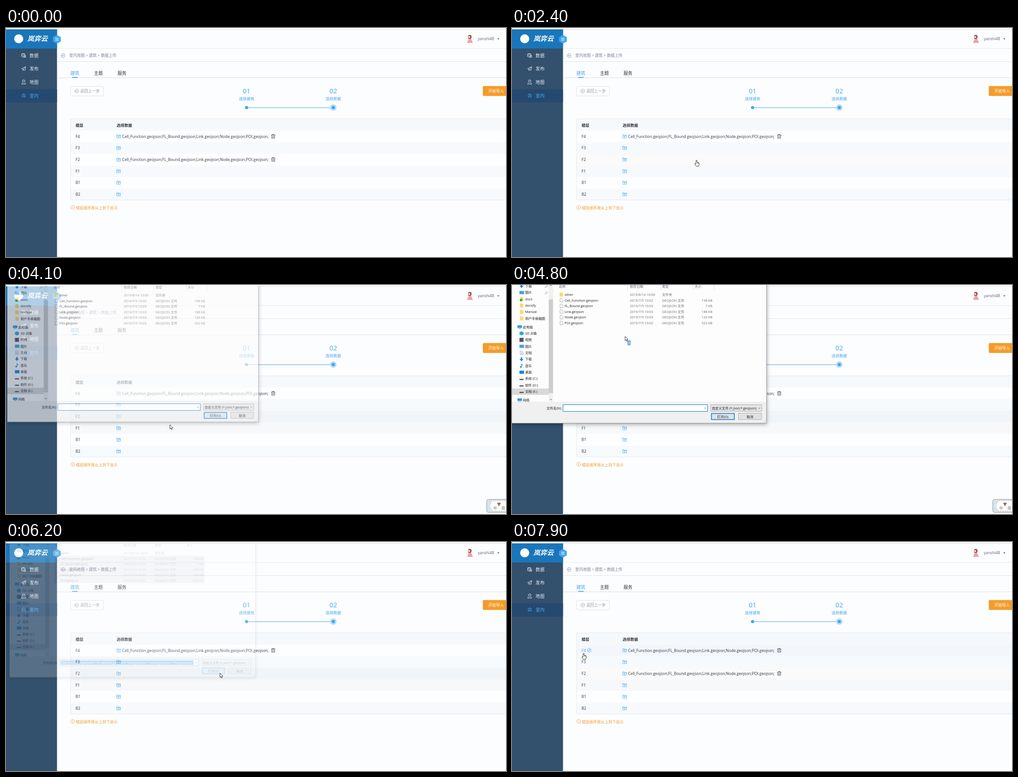
Animation, 1103 px wide and 508 px high, one loop 8 s. Source, as an HTML page with a canvas:

```html
<!DOCTYPE html>
<html lang="zh-CN">
<head>
<meta charset="utf-8">
<style>
html, body { margin: 0; width: 100%; height: 100%; overflow: hidden; background: #fcfdfe; }
canvas { display: block; }
</style>
</head>
<body>
<canvas id="stage" width="1103" height="508"></canvas>
<script>
const W = 1103, H = 508, LOOP = 8000;
const stage = document.getElementById('stage').getContext('2d');
const layer = Object.assign(document.createElement('canvas'), { width: W, height: H }).getContext('2d');
let c = stage;

const BLUE = '#43a5f0', INK = '#30343c', ORANGE = '#f39c2b', ACCENT = '#0078d7';
const FONT = '"Open Sans", "Noto Sans CJK SC", "Noto Sans CJK", sans-serif';
const FILES = ['Cell_Function', 'FL_Bound', 'Link', 'Node', 'POI'].map(n => n + '.geojson');
const SIZES = [198, 7, 188, 126, 522];

function text(s, x, y, color = INK, size = 8.55, align = 'left', style = '') {
  c.font = `${style} ${size}px ${FONT}`;
  c.textAlign = align;
  c.fillStyle = color;
  c.fillText(s, x, y + size * .36);
}
function box(x, y, w, h, fill, border, r = 0, lw = 1) {
  c.beginPath();
  c.roundRect(x, y, w, h, r);
  if (fill) { c.fillStyle = fill; c.fill(); }
  if (border) { c.strokeStyle = border; c.lineWidth = lw; c.stroke(); }
}
function dot(x, y, r, fill, border, lw = .8) {
  box(x - r, y - r, 2 * r, 2 * r, fill, border, r, lw);
}
function shape(d, x, y, fill, border, lw = .8) {
  const p = new Path2D(d);
  c.save();
  c.translate(x, y);
  if (fill) { c.fillStyle = fill; c.fill(p); }
  if (border) { c.strokeStyle = border; c.lineWidth = lw; c.stroke(p); }
  c.restore();
}

const ICON = {
  data: 'M0 1.5Q3.5-.8 7 1.5V7.5Q3.5 9.8 0 7.5ZM0 1.5Q3.5 3.5 7 1.5M0 4.5Q2 5.8 4 5.4M5 5H9V9H5Z',
  plane: 'M0 4.5L9 0L7.5 8.5L4 6.5L3 9V6L9 0M0 4.5L3 6',
  pin: 'M4.5 6.5Q1.5 4 1.5 2.6A3 3 0 0 1 7.5 2.6Q7.5 4 4.5 6.5ZM3.5 2.6H5.5M1.5 6L0 9H9L7.5 6',
  house: 'M0 4.5L4.7 .5L9.4 4.5M1.5 5V9M8 5V9M3.3 9V5.5L4.7 4.3L6.2 5.5V9M2.5 3L4.7 1.8L7 3',
  back: 'M2.3 0H-2.2M-.4-1.8L-2.2 0L-.4 1.8',
  upload: 'M.4 1H3.4L4.4 2.2H8.6V8.4H.4ZM.4 3.6H8.6M4.5 7.4V4.8M3.2 6L4.5 4.8L5.8 6',
  trash: 'M0 1.8H9M3 1.8V.4H6V1.8M1.2 2V8.8H7.8V2M3.5 4V7M5.5 4V7',
  arrow: 'M0 0V9.3L2.1 7.4L3.6 10.8L5.1 10.1L3.7 6.8H6.6Z',
  hand: 'M-1.1 1Q0-1 1.1 1V5Q5.6 5 5.8 7.3V10L4.6 13.6H-.6L-3.8 9.2Q-4 7-2.5 7.6L-1.1 9ZM2.6 5.5V7.3M4.2 5.8V7.5',
  chevron: 'M-2-1L0 1L2-1',
};
const NAV = {
  down: ['M3 0H6V4H9L4.5 9L0 4H3Z', '#2b7fd0'],
  pic: ['M0 1H10V8H0ZM1 6L4 4L6 6L9 5V7H1Z', '#4a9fdc'],
  folder: ['M1 0H4.5L5.5 1H8.5V9H1Z', '#ffd869'],
  pc: ['M0 1H10V6.5H0ZM2 7.5H8V8.5H2Z', '#3a94d4'],
  cube: ['M0 2L4.5 0L9 2V7L4.5 9L0 7Z', '#29a7d8'],
  film: ['M0 0H9V9H0Z', '#4b5568'],
  doc: ['M1.5 .5H6L8 2.5V8.5H1.5ZM3 4H6.5M3 6H6.5', '#fff', '#8a97a8'],
  music: ['M4 0Q8 2 7 5Q6.5 3 5 3V7.5A2 1.6 0 1 1 4 6Z', '#1e88d8'],
  desk: ['M0 1H10V8H0Z', '#1787d8'],
  drive: ['M0 5H9V7.5H0Z', '#4d4d4d'],
};

// [time, x, y] of the pointer tip
const PATH = [
  [500, 949, 103], [800, 677, 180], [1300, 566, 289], [1400, 579, 290], [1600, 579, 290], [1800, 586, 291],
  [2300, 586, 293], [2400, 407, 293], [2700, 300, 305], [3000, 251, 295], [3100, 251, 295], [3400, 365, 309],
  [3500, 361.5, 310], [4300, 361.5, 310], [4700, 261, 133], [4800, 249.5, 114], [5200, 195.5, 37.5],
  [5400, 195.5, 37.5], [5900, 472, 291], [6600, 472, 291], [7500, 171, 241], [7700, 171, 242],
  [7800, 162, 245], [7900, 158, 246.5],
];
function pointer(t) {
  const i = PATH.findIndex(k => k[0] > t);
  if (i < 0) return PATH[PATH.length - 1].slice(1);
  const [t0, x0, y0] = PATH[i - 1], [t1, x1, y1] = PATH[i], k = (t - t0) / (t1 - t0);
  return [x0 + (x1 - x0) * k, y0 + (y1 - y0) * k];
}

function sidebar() {
  box(0, 3, 112.5, 505, '#33506d');
  box(0, 3, 112.5, 42.5, '#1a76bb');
  box(0, 136, 112.5, 29, '#25496f');
  dot(28, 24, 10, '#fff');
  text('岚弈云', 47, 24, '#fff', 15, 'left', 'italic 900');
  shape('M0-9.5L8.5-4.8V4.8L0 9.5L-8.5 4.8V-4.8Z', 112.3, 25, BLUE);
  shape('M-3.5-2.5H3.5M-3.5 0H3.5M-3.5 2.5H3.5', 112.3, 25, null, '#fff', 1.1);
  [['数据', 'data'], ['发布', 'plane'], ['地图', 'pin'], ['室内', 'house']].forEach(([label, icon], i) => {
    const y = 61 + i * 29.7, color = i == 3 ? '#43adf8' : '#e8eef4';
    shape(ICON[icon], 34.5, y - 5, null, color, .9);
    text(label, 52, y, color, 9.9);
  });
}

function header() {
  box(0, 0, W, 3, '#fff');
  box(0, 2.6, W, .9, '#d9dce2');
  box(112.5, 45, W, 1, '#e6eaf1');
  box(112.5, 74, W, 1, '#dde3ed');
  box(112.5, 110, W, 1, '#d5ddec');
  dot(1023, 24, 10, '#fdfaf8');
  shape('M-1-9Q5-9 4-3L2 1L-3 0Q-5-8-1-9Z', 1023, 24, '#8a5a4c');
  dot(1022, 20, 2.2, '#f5d3c3');
  shape('M-2 0H3L7 9H-6Z', 1023, 24, '#ee9fae');
  text('yanshi48', 1041, 24, '#5b6474');
  shape('M-2.5-1H2.5L0 1.7Z', 1086, 24, '#5b6474');

  dot(126, 61, 4.1, null, '#7a869e');
  shape(ICON.back, 126, 61, null, '#7a869e');
  text('室内地图 > 建筑 > 数据上传', 139.5, 60.5, '#7a869e');
  ['建筑', '主题', '服务'].forEach((s, i) => text(s, 142 + i * 52, 100.5, i ? INK : BLUE, 9.8));
  box(146, 108.7, 12, 1.8, BLUE);

  box(142.5, 129.5, 72.5, 21, '#fff', '#d9dfe9', 2);
  dot(156, 140, 4.2, null, '#8d95a8');
  shape(ICON.back, 156, 140, null, '#8d95a8');
  text('返回上一步', 164, 140, '#8d95a8');

  box(531, 176.2, 191, 1, BLUE);
  dot(722, 176.5, 7.2, '#b5ddfb');
  [['01', '选择建筑', 530.7], ['02', '选择数据', 722]].forEach(([n, s, x]) => {
    text(n, x, 140, BLUE, 14.8, 'center');
    text(s, x, 157, BLUE, 8.5, 'center');
    dot(x, 176.5, 3.6, BLUE);
  });
  box(1051.8, 128.8, 60, 22, ORANGE, null, 2);
  text('开始导入', 1064, 140, '#fff');
}

function rowTints(t) {
  if (t < 1100) return {};
  if (t < 3200) return { 2: '#fafafa' };
  if (t < 7200) return { 2: '#f2f5f8', 3: '#f6f8f9' };
  return { 0: '#f3f6fb', 2: '#fafafa', 3: '#f6f8f9' };
}
function table(t) {
  const tints = rowTints(t), rowH = 25.7;
  box(142, 201.5, W, 26.5, '#f6f9fc');
  ['F4', 'F3', 'F2', 'F1', 'B1', 'B2'].forEach((floor, i) => {
    const y = 240.6 + i * rowH, editing = i == 0 && t >= 7400;
    box(142, y - 12.8, W, rowH, tints[i] || (i % 2 ? '#f6fafd' : '#fdfeff'));
    text(floor, 153.5, y, editing ? BLUE : INK);
    if (editing) {
      dot(170.4, y - .3, 4.1, null, BLUE);
      shape('M-1.8 1.8L-1.4 .3L1.2-2.2L2.1-1.2L-.4 1.3Z', 170.4, y - .3, null, BLUE);
    }
    shape(ICON.upload, 244, y - 5, null, BLUE);
    if (i == 0 || i == 2 && (t < 2000 || t >= 6400)) {
      text(FILES.join(';') + ';', 256, y);
      shape(ICON.trash, 585, y - 5, null, i && t >= 1700 && t < 2000 ? BLUE : '#3b3f55', .9);
    }
  });
  box(142.5, 201.5, W, 180, null, '#e4eaf1');
  text('楼层', 153.5, 216, INK, 8.5, 'left', 'bold');
  text('选择数据', 244, 216, INK, 8.5, 'left', 'bold');
  dot(147, 398, 4.2, null, ORANGE);
  shape('M0-2.3V-1.4M0-.6V2.3', 147, 398, null, ORANGE, .9);
  text('楼层顺序按从上到下显示', 154, 398.5, ORANGE, 8.4);
}

function inputPanel() {
  box(1060.5, 475.5, 60, 29, '#cfe6f1', '#9c9298', 4);
  shape('M0 12L6 0H50V24H6Z', 1066, 478, '#fbfbf8');
  c.setLineDash([3, 2]);
  shape('M50 0H5L0 12L5 23H50', 1067, 478.5, null, '#c99c92');
  c.setLineDash([]);
  shape('M-4-2L-1.5-3.5Q0-2 1.5-3.5L4-2L3 .3L2 0V3.5H-2V0L-3 .3Z', 1087.5, 486, '#8a6f70');
  text('中', 1079, 495, '#77706f', 8, 'center');
  text('简', 1097, 495, '#77706f', 8, 'center');
}

function label(s, x, y, color = '#1c1c1c', align) { text(s, x, y, color, 7.35, align); }

function navPane() {
  const items = [
    ['下载', 'down'], ['图片', 'pic'], ['docs', 'folder'], ['docsify', 'folder'], ['Manual', 'folder'], ['用户手册截图', 'folder'],
    ['此电脑', 'pc', 93], ['3D 对象', 'cube'], ['视频', 'film'], ['图片', 'pic'], ['文档', 'doc'], ['下载', 'down'], ['音乐', 'music'],
    ['桌面', 'desk'], ['系统 (C:)', 'drive'], ['软件 (D:)', 'drive'], ['文档 (E:)', 'drive'], ['网络', 'pc', 255],
  ];
  box(0, 229.5, 81, 14.3, '#d9d9d9');
  let y = -12;
  for (const [s, icon, top] of items) {
    y = top || y + 14.35;
    const [d, fill, border] = NAV[icon];
    shape(d, top ? 12 : 16.5, y - 4.5, fill, border);
    label(s, top ? 24 : 29, y);
  }
  dot(20, 33.5, 2.8, '#27a845');
  for (const py of [2, 16]) shape('M0 0L3 3M1.5-2.5L5 1M-2.5 4.5L1 1.5', 74.5, py, null, '#777');
  box(81, 0, 9.5, 259, '#f0f0f0');
  box(81, 32, 9.5, 208, '#cdcdcd');
  shape(ICON.chevron, 85.7, 254, null, '#444', 1);
  shape('M-2 1L0-1L2 1', 85.7, 1, null, '#444', 1);
}

function fileList(t) {
  const [px, py] = pointer(t - 50), dragging = t >= 4700 && t < 5200;
  ['名称', '修改日期', '类型', '大小'].forEach((s, i) => label(s, [103.5, 260, 331, 403][i], 3, '#5b6b85'));
  for (const x of [255, 327, 399, 446]) box(x, 0, 1, 12, '#e5e5e5');
  shape(NAV.folder[0], 104, 16.5, NAV.folder[1]);
  label('other', 116, 21.2);
  label('2019/8/14 10:00', 260, 21.2, '#6d6d6d');
  label('文件夹', 331, 21.2, '#6d6d6d');
  FILES.forEach((name, i) => {
    const y = 33.9 + i * 12.55;
    const selected = t >= 5200 || dragging && py < y + 6;
    if (selected) box(101.8, y - 6.3, 343, 12.55, t < 5900 ? '#cce8ff' : '#d9d9d9', t < 5900 ? '#99d1ff' : null, 0, .7);
    shape('M.5 .5H5L7 2.5V8.5H.5Z', 105.5, y - 4.5, '#fff', '#8c8c8c', .7);
    label(name, 116, y);
    label(`2019/7/5 10:0${i % 4 ? 3 : 2}`, 260, y, '#6d6d6d');
    label('GEOJSON 文件', 331, y, '#6d6d6d');
    label(SIZES[i] + ' KB', 442, y, '#6d6d6d', 'right');
  });
  if (dragging && t > 4700) box(px, py, 261 - px, 133 - py, 'rgba(0,120,215,.4)', ACCENT, 0, .8);
}

function dialogFooter(t) {
  box(0, 259, 561.5, 47.5, '#f0f0f0');
  label('文件名(N):', 110, 273, '#1c1c1c', 'right');
  box(112.5, 265.5, 319, 15, '#fff', t < 5200 ? ACCENT : '#7a7a7a');
  if (t >= 5200) {
    const names = FILES.map(f => `"${f}"`).join(' ');
    c.save();
    c.beginPath();
    c.rect(113.5, 266, 306.5, 14);
    c.clip();
    if (t < 5900) label(names, 114.5, 273);
    else {
      box(115.5, 268, 304, 10, ACCENT);
      label(names, 419, 273, '#fff', 'right');
    }
    c.restore();
  }
  shape(ICON.chevron, 426, 273, null, '#444');
  box(438.5, 265.5, 112.5, 14.5, '#e4e4e4', '#adadad');
  label('自定义文件 (*.json;*.geojson)', 441, 273);
  shape(ICON.chevron, 545.5, 273, null, '#444');
  box(440, 285, 50.5, 13.5, t >= 5900 ? '#cce4f7' : '#e1e1e1', ACCENT, 0, 1.5);
  label('打开(O)', 465, 292, '#1c1c1c', 'center');
  box(499.5, 284.5, 51, 14, '#e1e1e1', '#adadad');
  label('取消', 525, 292, '#1c1c1c', 'center');
  for (const [x, y] of [[558, 300], [558, 303], [555, 303]]) box(x, y, 1.2, 1.2, '#b5b5b5');
}

function dialog(t) {
  const shown = Math.min((t - 3900) / 300, 1 - (t - 6000) / 250, 1);
  if (shown <= 0) return;
  c = layer;
  c.clearRect(0, 0, W, H);
  c.shadowColor = 'rgba(0,0,0,.35)';
  c.shadowBlur = 9;
  c.shadowOffsetY = 2;
  box(0, -5, 561.5, 311.5, '#fdfdfd');
  c.shadowColor = 'transparent';
  navPane();
  fileList(t);
  dialogFooter(t);
  box(-1, -5, 562.5, 311.5, null, '#8f9499');
  c = stage;
  const s = 1 - (1 - shown) * .0425;
  c.save();
  c.globalAlpha = shown;
  c.translate(240 * (1 - s), 115 * (1 - s));
  c.scale(s, s);
  c.drawImage(layer.canvas, 0, 0);
  c.restore();
}

function draw(t) {
  box(0, 0, W, H, '#fcfdfe');
  header();
  sidebar();
  table(t);
  if (t >= 3700 && t < 6100) inputPanel();
  dialog(t);
  if (t >= 500) {
    const [x, y] = pointer(t), hand = t >= 1200 && t < 3200 || t >= 7300;
    shape(hand ? ICON.hand : ICON.arrow, x, y, '#fff', '#222', .9);
  }
}

function tick() {
  const t = performance.now() % LOOP;
  draw(Math.floor(t / 100) * 100);
  requestAnimationFrame(tick);
}
tick();
</script>
</body>
</html>
```
